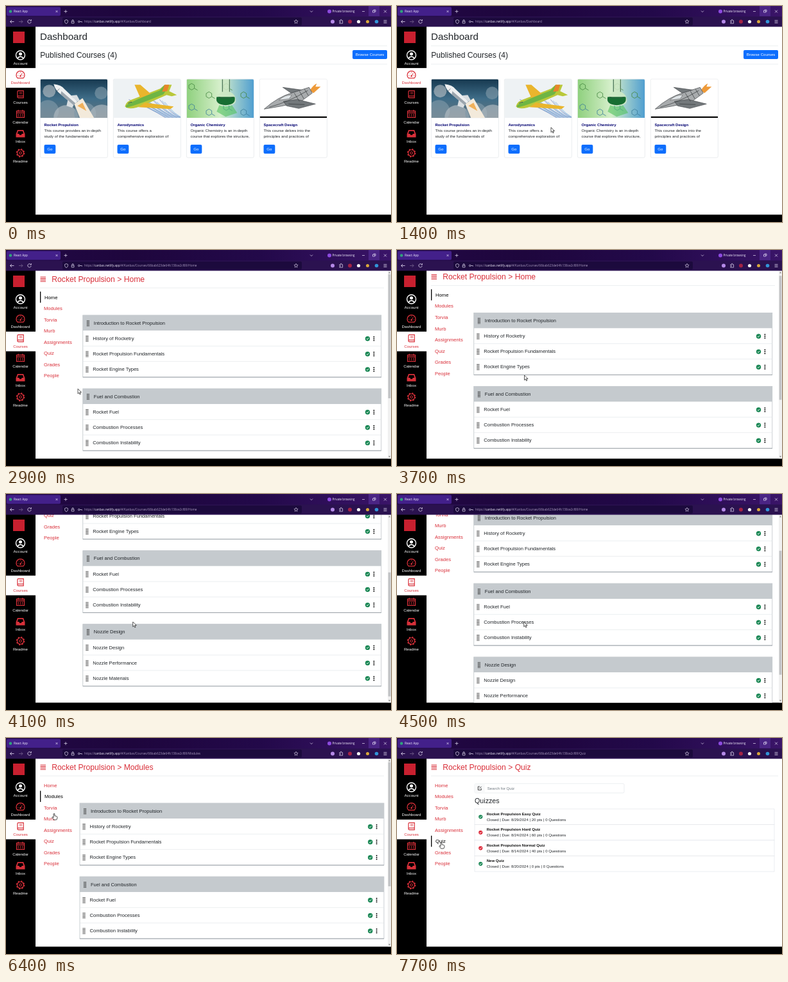
An HTML page for the animation above (8000 ms loop, 600 by 338 pixels).

```html
<!DOCTYPE html>
<html lang="en">
<head>
<meta charset="utf-8">
<title>Course dashboard</title>
<style>
  html, body { margin: 0; width: 100%; height: 100%; overflow: hidden; background: #000; }
  svg { display: block; width: 600px; height: 338px; }
  text { font-family: "Liberation Sans", Arial, sans-serif; white-space: pre; }
  .ui text { font-family: "Open Sans", sans-serif; }
</style>
</head>
<body>
<svg id="stage" viewBox="0 0 600 338"></svg>
<script>
const RED = '#d9303a', GREEN = '#198754', BLUE = '#0d6efd', INK = '#212529';

// Markup helpers; text is placed by the middle of its capitals.
const text = (x, y, s, size = 6.1, fill = INK, more = '') =>
  `<text x="${x}" y="${y + size * 0.36}" font-size="${size}" fill="${fill}" ${more}>${s}</text>`;
const rect = (x, y, w, h, fill, more = '') =>
  `<rect x="${x}" y="${y}" width="${w}" height="${h}" fill="${fill}" ${more}/>`;
const dot = (x, y, r, fill, more = '') => `<circle cx="${x}" cy="${y}" r="${r}" fill="${fill}" ${more}/>`;
const line = (d, stroke, width = 1, more = '') =>
  `<path d="${d}" fill="none" stroke="${stroke}" stroke-width="${width}" ${more}/>`;
const shape = (d, fill, more = '') => `<path d="${d}" fill="${fill}" ${more}/>`;
const at = (x, y, body, more = '') => `<g transform="translate(${x} ${y})" ${more}>${body}</g>`;
const repeat = (n, fn) => Array.from({ length: n }, (_, i) => fn(i)).join('');
const rule = (y, x2) => line(`M53 ${y}H${x2}`, '#dee2e6', 0.6);
const button = (x, y, w, label) => rect(x, y, w, 14, BLUE, 'rx="2"') +
  text(x + w / 2, y + 7, label, 6.1, '#fff', 'text-anchor="middle"');
const check = (x, y, fill, r = 3.7) => dot(x, y, r, fill) +
  line(`M${x - 1.7} ${y}l1.3 1.4 2.2-2.7`, '#fff', 0.9);

// Browser window
function browser() {
  const icon = '#e6def5';
  return `<g class="ui">` +
    rect(0, 0, 600, 17, 'url(#strip)') + rect(1, 1.5, 84, 14, '#43208a', 'rx="2"') +
    dot(7, 8.5, 2.3, '#2fa37c') + text(12, 8.5, 'React App', 4.7, '#f4f0ff') +
    line('M77.5 7l3 3m0-3l-3 3M90.5 8.5h5M93 6v5M474 7.5l2 2 2-2', icon, 0.7) +
    dot(504, 8.5, 3, '#8d4be0') + text(508.5, 8.5, 'Private browsing', 4.5, '#f4f0ff') +
    rect(565, 0, 17, 16, '#4a2484') +
    line('M555 8.5h4M571.5 7h3v3h-3zM573 7V6h3v3h-1M589 6.5l4 4m0-4l-4 4', icon, 0.7) +
    rect(0, 16.5, 600, 16, '#2b1250') + rect(88, 18, 373, 12.5, '#1c0a3d', 'rx="2"') +
    line('M12.5 24.5h-6m2.5-2.5l-2.5 2.5 2.5 2.5M38.6 22.6a2.7 2.7 0 1 0 .6 2.2m.2-3.8v2h-2', icon, 0.8) +
    line('M20 24.5h6m-2.5-2.5l2.5 2.5-2.5 2.5', '#75628f', 0.8) +
    line('M94 21.5l2.4 1v2q0 2-2.4 3.3-2.4-1.3-2.4-3.3v-2zM102.2 24h3.8v3h-3.8zM102.9 24v-1.2a1.2 1.2 0 0 1 2.4 0v1.2M115 24.5h3.3v1.3', icon, 0.7) +
    dot(113.7, 24.5, 1.3, 'none', `stroke="${icon}" stroke-width=".7"`) +
    `<text id="url" x="122" y="26.1" font-size="4.7" fill="#a99abf"></text>` +
    line('M452 21.3l.9 2 2.2.2-1.7 1.5.5 2.2-1.9-1.2-1.9 1.2.5-2.2-1.7-1.5 2.2-.2z', icon, 0.6) +
    dot(509, 24.5, 3, '#b58ae8') +
    line('M519.8 22.8h1.6v-.8a.8.8 0 0 1 1.6 0v.8h1.6v4.4h-4.8v-1.4h.8a.8.8 0 0 0 0-1.6h-.8z', icon, 0.7) +
    dot(536, 24.5, 3, '#a32345') + dot(549.5, 24.5, 2.6, '#f4f4f4') +
    dot(563.5, 24.5, 2.5, '#d9a83b') + dot(577.5, 24.5, 2.8, '#3294d8') +
    line('M588.5 22.5h5m-5 2h5m-5 2h5', icon, 0.7) + `</g>`;
}

// Left navigation
const navIcons = [
  c => dot(0, 0, 7, 'none', `stroke="${c}" stroke-width="1.4"`) + dot(0, -2, 2.5, c) + line('M-4.6 4.8Q0-.5 4.6 4.8', c, 1.8),
  c => line('M-4.5 5.2a6.5 6.5 0 1 1 9 0z', c, 1.3) + line('M0 2L2.8-2.4M-4.2 1h1M3.4 1h1M-2.8-2.6l.7.7M0-4.5v1', c, 1) + dot(0, 2, 1.3, c),
  c => line('M-3.3-5.6h8v11h-8q-1.3 0-1.3-1.3v-8.4q0-1.3 1.3-1.3zM-4.6 4q0-1.4 1.3-1.4h8', c, 1.2) + line('M-1.8-3h4.5m-4.5 2h4.5', c, 0.8),
  c => line('M-6-4.5h12v10h-12zM-6-1.6h12M-3.3-6.3v3M3.3-6.3v3', c, 1.2) + line('M-4 .8h8m-8 2.3h8', c, 1.3, 'stroke-dasharray="1.5 1.7"'),
  c => shape('M-7 1l2.4-6.5h9.2L7 1v5.2H-7zM-4.8.6h2.6l1 2h2.4l1-2h2.6l-1.3-4.3h-7z', c, 'fill-rule="evenodd"'),
  c => dot(0, 0, 5, 'none', `stroke="${c}" stroke-width="1.2"`) + dot(0, 0, 6, 'none', `stroke="${c}" stroke-width="1.5" stroke-dasharray="2.3 2.41"`) + dot(0, 0, 1.9, 'none', `stroke="${c}"`)
];
const navLabels = ['Account', 'Dashboard', 'Courses', 'Calendar', 'Inbox', 'Readme'];

const sidebar = active => rect(0, 32, 46, 306, '#000') + rect(11, 40, 18, 18, '#c8202f') +
  repeat(6, i => {
    const y = 77 + i * 30.6, on = i === active;
    return (on ? rect(0, y - 10.5, 46, 30.8, '#fff') : '') +
      at(22.5, y, navIcons[i](i ? RED : '#fff')) +
      text(22.5, y + 12.7, navLabels[i], 6.1, on ? RED : '#fff', 'text-anchor="middle"');
  });

// Dashboard
const pictures = [
  rect(0, 0, 105, 61, 'url(#sky)') +
    [[12, 50, 17], [40, 60, 19], [70, 54, 17], [96, 60, 20], [95, 22, 10], [14, 19, 10]]
      .map(([x, y, r], i) => dot(x, y, r, i % 2 ? '#b4bec4' : '#7f98a8', 'opacity=".65"')).join('') +
    shape('M53 39L66 30 84 61H62z', '#f3eadb') + shape('M58 42l8-5 6 13z', '#f0b05a') +
    at(41, 23, shape('M-20-15Q-8-14-3-7L17 12 11 18-9 1Q-18-6-20-15z', '#eef0f1') +
      shape('M-9 1L11 18l3-3L-8-4z', '#9ba5ad') + shape('M6 3l10-1 5 9-4 1zM2 10l-2 9 9 3 2-4z', '#d9dee1') +
      line('M-11-8l-5 5', '#58636b', 0.8)),
  rect(0, 0, 105, 61, '#eef2f4') +
    repeat(15, i => line(`M${24 + i * 4} ${32 + i % 3 * 2}Q${55 + i * 3} ${44 + i}${' '}${82 + i * 2} 61`, i % 3 ? '#639fd6' : '#5965a8', 0.6)) +
    shape('M18 43Q20 34 32 31L73 15 80 9 91 9 87 19 99 25 91 27 83 25 47 41Q25 50 18 43z', '#b9c83a') +
    shape('M44 34L33 9 42 9 65 29zM49 37L94 43 89 47 39 44z', '#e9b52d') +
    shape('M20 41Q32 33 72 18L80 9 84 15 78 24Q42 39 20 45z', '#6fb544') +
    shape('M80 9l7 0-3 10-8 1z', '#e8842b') + line('M23 38q3-2 6-2', '#355', 1),
  rect(0, 0, 105, 61, 'url(#lab)') +
    repeat(8, i => line('M0-5l4.3 2.5v5L0 5l-4.3-2.5v-5zM4.3 2.5l5 3', i < 4 ? '#43863f' : '#397c9a', 0.8,
      `transform="translate(${8 + i % 4 * 27} ${i < 4 ? 12 + i % 2 * 13 : 44 + i % 2 * 8})"`)) +
    shape('M55 0h13v20q9 5 9 13 0 9-16 9t-16-9q0-8 10-13z', '#cfe9c5', 'opacity=".85"') +
    shape('M47 28h28q3 12-14 13-17-1-14-13z', '#176e32') + line('M56 0v20m11-20v20M50 28q11 4 23 0', '#315c42', 1) +
    shape('M51 41q10 4 20 0l8 12-18 6-14-8z', '#53c45e', 'opacity=".6"'),
  rect(0, 0, 105, 61, '#fff') + rect(0, 58.5, 105, 2.5, '#050505') +
    shape('M78 18Q84 9 89 7L87 12 95 12 84 22z', '#ee9a39') +
    shape('M7 47Q28 28 52 21L77 13 82 22 63 36Q34 43 7 47z', '#a8abad', 'stroke="#45494c" stroke-width=".7"') +
    shape('M37 35L59 32 87 39 61 46 42 42zM49 22L36 13 65 17z', '#73787b', 'stroke="#3d4144" stroke-width=".6"') +
    shape('M30 33q10-9 20-8l-4 6z', '#dfe4e7', 'stroke="#555" stroke-width=".5"') +
    line('M15 44Q45 36 75 18M54 22l8 13M62 19l7 12M70 16l6 10M45 39l25 1', '#34383a', 0.7)
];
const courses = [
  ['Rocket Propulsion', 'This course provides an in-depth', 'study of the fundamentals of'],
  ['Aerodynamics', 'This course offers a', 'comprehensive exploration of'],
  ['Organic Chemistry', 'Organic Chemistry is an in-depth', 'course that explores the structure,'],
  ['Spacecraft Design', 'This course delves into the', 'principles and practices of']
];
const dashboard = () => text(53, 47.5, 'Dashboard', 15.1) + rule(62.3, 594) +
  text(53.3, 76.5, 'Published Courses (4)', 12.1) + button(540, 69, 54, 'Browse Courses') + rule(91, 594) +
  courses.map(([title, first, second], i) => at(53.3 + i * 114, 114.3,
    rect(0, 0, 105, 123, '#fff', 'rx="2.2" stroke="#dcdfe2" stroke-width=".6"') +
    `<g clip-path="url(#cardTop)">${pictures[i]}</g>` +
    text(6.2, 71.8, title, 6.05, '#000070', 'font-weight="bold"') +
    text(6.2, 80.9, first) + text(6.2, 90, second) + button(6.2, 102.7, 17.8, 'Go'))).join('');

// Course pages
const menu = ['Home', 'Modules', 'Torvia', 'Murb', 'Assignments', 'Quiz', 'Grades', 'People'];
const coursePage = (name, right) =>
  line('M53.5 42.2h8.5m-8.5 2.4h8.5m-8.5 2.4h8.5m-8.5 2.2h8.5', RED, 1.1) +
  text(71.3, 45.8, 'Rocket Propulsion &gt; ' + name, 12.15, RED) + rule(59.3, right) +
  menu.map((label, i) => {
    const y = 73.8 + i * 17.55, on = label === name;
    return (on ? rect(53, y - 8.7, 1.3, 17.4, '#000') : '') + text(on ? 60 : 59, y, label, 7.65, on ? '#000' : RED);
  }).join('');

const modules = [
  ['Introduction to Rocket Propulsion', 'History of Rocketry', 'Rocket Propulsion Fundamentals', 'Rocket Engine Types'],
  ['Fuel and Combustion', 'Rocket Fuel', 'Combustion Processes', 'Combustion Instability'],
  ['Nozzle Design', 'Nozzle Design', 'Nozzle Performance', 'Nozzle Materials']
];
const grip = (x, y) => line(`M${x - 1.1} ${y - 4.6}v9.4m2.3-9.4v9.4`, '#222', 1.3, 'stroke-dasharray="1.3 .75"');
const moduleList = (x, w) => modules.map(([title, ...rows], i) => at(x, 102 + i * 115,
  rect(0, 0, w, 97, '#fff', 'stroke="#b4babf" stroke-width=".7"') + rect(0, 0, w, 24, '#c5cace') +
  line(`M0 97H${w}`, '#8f969c', 0.8) + grip(8, 12.5) + text(17, 12, title, 7.55) +
  rows.map((label, j) => {
    const y = 36.2 + j * 24.1;
    return (j ? line(`M0 ${y - 12}H${w}`, '#dee2e6', 0.6) : '') + grip(6.5, y + 0.5) + text(15.5, y, label, 7.6) +
      check(w - 21.3, y + 0.5, GREEN) + [-2.8, 0, 2.8].map(d => dot(w - 11.4, y + 0.5 + d, 1, '#111')).join('');
  }).join(''))).join('');

const quizzes = [
  ['Rocket Propulsion Easy Quiz', '8/29/2024 | 20 pts', GREEN],
  ['Rocket Propulsion Hard Quiz', '8/24/2024 | 60 pts', '#dc2535'],
  ['Rocket Propulsion Normal Quiz', '8/14/2024 | 40 pts', '#dc2535'],
  ['New Quiz', '8/20/2024 | 0 pts', GREEN]
];
const quizList = () =>
  rect(121, 71.3, 233, 14.7, '#fff', 'rx="2" stroke="#dee2e6" stroke-width=".6"') + rect(121.3, 71.6, 15.7, 14.1, '#f8f9fa') +
  line('M129 76h-2.7v5.3h5v-2.6M128.3 79.3l3.2-3.4', '#333', 0.9) + text(140.8, 78.6, 'Search for Quiz', 6.1, '#6c757d') +
  text(121, 98.3, 'Quizzes', 10.7) +
  quizzes.map(([title, info, color], i) => at(121, 111 + i * 24.5,
    rect(0, 0, 467, 24.5, '#fff', 'stroke="#dee2e6" stroke-width=".6"') + check(9.3, 12.3, color, 3.1) +
    text(18.7, 7.4, title, 6.05, '#111', 'font-weight="bold"') +
    text(18.7, 16.6, `Closed | Due: ${info} | 0 Questions`, 6.05))).join('');

const scrollbar = () => rect(595, 32, 5, 294.5, '#f1f1f1') + shape('M596 36.2l1.5-2 1.5 2zM596 322.5l1.5 2 1.5-2z', '#777') +
  rect(595.6, 38, 3.8, 194, '#c2c4c6', 'id="thumb"');

const gradient = (id, vertical, colors) => `<linearGradient id="${id}" x2="${vertical ? 0 : 1}" y2="${vertical ? 1 : 0}">` +
  colors.map((c, i) => `<stop offset="${i / (colors.length - 1)}" stop-color="${c}"/>`).join('') + '</linearGradient>';
const group = (id, body) => `<g id="${id}">${body}</g>`;

document.getElementById('stage').innerHTML = '<defs>' +
  gradient('strip', false, ['#220844', '#1e063d', '#23094a', '#3a1468']) +
  gradient('sky', true, ['#16384f', '#3f6d88', '#64727b']) +
  gradient('lab', false, ['#8ed07d', '#d6efcb', '#4f9ed0']) +
  '<clipPath id="cardTop"><path d="M.3 61V2.2q0-2 2-2h100.4q2 0 2 2V61z"/></clipPath>' +
  '<clipPath id="view"><path d="M46 32H600V326.5H46z"/></clipPath></defs>' +
  rect(0, 0, 600, 338, '#000') + rect(46, 32, 554, 294.5, '#fff') +
  '<g clip-path="url(#view)">' +
  group('Dashboard', dashboard()) +
  group('Home', coursePage('Home', 589) + moduleList(119.8, 465)) +
  group('Modules', coursePage('Modules', 589) + moduleList(115, 474)) +
  group('Quiz', coursePage('Quiz', 594) + quizList()) +
  group('bar', scrollbar()) + '</g>' +
  group('navDashboard', sidebar(1)) + group('navCourses', sidebar(2)) + browser() +
  group('cursor',
    group('arrow', shape('M0 0v7.6l1.8-1.6 1.2 2.8 1.3-.6-1.2-2.7h2.4z', '#fff', 'stroke="#111" stroke-width=".7"')) +
    group('hand', shape('M-.9.8q.9-1.5 1.8 0v3l1.2.2 1 .3 1 .4q1 .4.9 1.5l-.6 2.6-.7 1.2h-4.1L-3 6.6q-.4-1.1.6-1.2L-.9 6.6z',
      '#fff', 'stroke="#111" stroke-width=".75"')));

// Timeline
const DURATION = 8000;
const pages = [['Dashboard', 0], ['Home', 2500], ['Modules', 5500], ['Quiz', 7500]];
const cursorKeys = [
  [100, 330, 34], [900, 240, 190], [1400, 240, 190], [2200, 72, 227], [2600, 72, 227], [3400, 198.5, 196],
  [3700, 198.5, 196], [4000, 197.7, 200], [4900, 197.7, 200], [5300, 66, 88], [6000, 66, 88],
  [6400, 75, 118], [6800, 78, 138], [7300, 69, 163]
];
const scrollKeys = [[3650, 0], [4150, 132], [4300, 132], [4750, 0]];

function track(keys, t) {
  const next = keys.findIndex(k => k[0] > t);
  if (next < 0) return keys[keys.length - 1].slice(1);
  if (!next) return keys[0].slice(1);
  const a = keys[next - 1], b = keys[next], u = (t - a[0]) / (b[0] - a[0]), e = u * u * (3 - 2 * u);
  return a.slice(1).map((v, i) => v + (b[i + 1] - v) * e);
}

const el = id => document.getElementById(id);
const show = (id, on) => el(id).setAttribute('display', on ? 'inline' : 'none');
const move = (id, x, y) => el(id).setAttribute('transform', `translate(${x} ${y})`);
let shownPage;

function openPage(page) {
  shownPage = page;
  const home = page === 'Dashboard';
  pages.forEach(([id]) => show(id, id === page));
  show('navDashboard', home);
  show('navCourses', !home);
  show('bar', page === 'Home' || page === 'Modules');
  el('url').innerHTML = 'https://<tspan fill="#f4f0ff">canbas.netlify.app</tspan>/#/Kanbas/' +
    (home ? '' : 'Courses/66bab623de64fc138ce2cf89/') + page;
}

function frame(now) {
  const t = Math.floor(now % DURATION / 100) * 100;
  const page = pages.filter(p => p[1] <= t).pop()[0];
  if (page !== shownPage) openPage(page);
  const [scroll] = track(scrollKeys, t);
  move('Home', 0, -scroll);
  move('thumb', 0, scroll * 0.66);
  const pointing = t >= 2200 && t < 2700 || t >= 5200;
  show('cursor', t >= 100);
  show('hand', pointing);
  show('arrow', !pointing);
  move('cursor', ...track(cursorKeys, t));
  requestAnimationFrame(frame);
}
requestAnimationFrame(frame);
</script>
</body>
</html>
```
